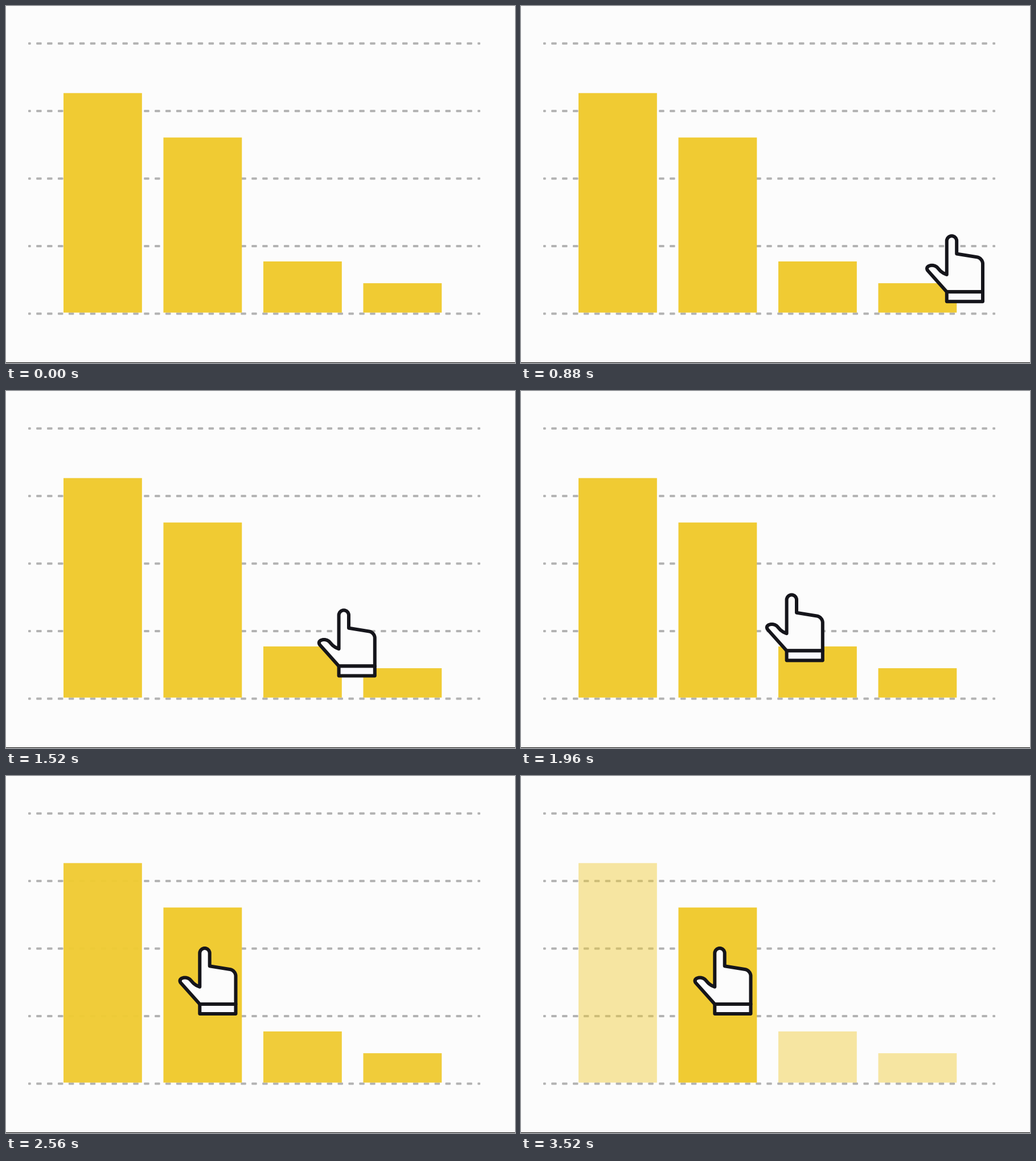
These frames come from a looping animation (894x626 px, 5000 ms). A matplotlib script:

```python
import numpy as np
import matplotlib.pyplot as plt
from matplotlib.animation import FuncAnimation
from matplotlib.collections import PolyCollection
from matplotlib.patches import PathPatch, Rectangle
from matplotlib.path import Path
from matplotlib.transforms import Affine2D

W, H = 894, 626
DPI = 64
PX = 72 / DPI  # points per pixel
FRAMES, STEP = 125, 40

PAPER, GRID, BAR, INK, CUFF = "#fcfcfc", "#b2b2b2", "#f0cb33", "#15151b", "#f9f9fd"

fig = plt.figure(figsize=(W / DPI, H / DPI), dpi=DPI, facecolor=PAPER)
ax = fig.add_axes([0, 0, 1, 1])
ax.axis("off")


def box(x0, y0, x1, y1):
    return [(x0, y0), (x1, y0), (x1, y1), (x0, y1)]


def rounded(corners):
    """Closed path through (x, y, radius) corners, each rounded by its radius."""
    pts = np.array([c[:2] for c in corners], float)
    verts, codes = [], []
    for i, (p, r) in enumerate(zip(pts, (c[2] for c in corners))):
        back, ahead = pts[i - 1] - p, pts[(i + 1) % len(pts)] - p
        back, ahead = (r * v / np.hypot(*v) for v in (back, ahead))
        verts += [p + back, p + 0.45 * back, p + 0.45 * ahead, p + ahead]
        codes += [Path.LINETO] + [Path.CURVE4] * 3
    codes[0] = Path.MOVETO
    return Path(verts + verts[:1], codes + [Path.CLOSEPOLY])


# Dashed grid lines, with half a dash at each end
LEFT, RIGHT, PERIOD = 39, 833, 794 / 42
dashes = []
for row in range(5):
    y = 65.7 + 118.45 * row
    for mid in LEFT + PERIOD * np.arange(43):
        x0, x1 = max(LEFT, mid - PERIOD / 4), min(RIGHT, mid + PERIOD / 4)
        dashes.append(box(x0 + 1, y - 1, x1 - 1, y + 1))
ax.add_collection(PolyCollection(dashes, facecolors=GRID, edgecolors=GRID, snap=False,
                                 linewidths=2 * PX, joinstyle="round", zorder=1))

# Bars
BASE, BAR_W, PITCH = 537.6, 137.8, 175.5
bars = [ax.add_patch(Rectangle((101 + PITCH * i, BASE - h), BAR_W, h,
                               fc=BAR, lw=0, snap=False, zorder=2))
        for i, h in enumerate([384.9, 307, 89.7, 51.5])]
faded = bars[:1] + bars[2:]

ax.add_patch(Rectangle((0, H - 1), W, 1, fc="black", lw=0, zorder=2))

# Pointing hand, measured from its top left corner
WRIST, SIDE, TIP = 37.8, 101, 3
palm = rounded([
    (WRIST, 101, 0), (-0.7, 58, 8), (16, 52.5, 8), (29, 67, 5), (WRIST, 70.8, 0),
    (WRIST, TIP, 8.7), (WRIST + 17.4, TIP, 8.7), (WRIST + 17.4, 34.3, 0),
    (SIDE, 41.7, 10), (SIDE, 101, 0)])
cuff = rounded([(x, y, 0) for x, y in box(WRIST, 101, SIDE, 118)])
hand = [ax.add_patch(PathPatch(shape, fc=fill, ec=INK, lw=6 * PX, snap=False,
                               joinstyle="round", zorder=3))
        for shape, fill in [(palm, PAPER), (cuff, CUFF)]]
ax.set(xlim=(0, W), ylim=(H, 0))

# One Bezier curve from the right edge to the second bar, measured by arc length
ends = np.array([(302.5, 299), (452, 396), (740, 406), (890, 406)])
t = np.linspace(0, 1, 800)[:, None]
basis = np.hstack([(1 - t) ** 3, 3 * t * (1 - t) ** 2, 3 * t ** 2 * (1 - t), t ** 3])
track = basis @ ends
length = np.r_[0, np.cumsum(np.hypot(*np.diff(track, axis=0).T))]

# Motion runs at 30 ticks a second and is shown at 25
ENTER, ARRIVE, SPEED = 5, 75, 8.65
FADE_TICKS, FADE_TO = 30, 0.45


def draw(k):
    tick = int(1.2 * k + 0.25)
    left = max(0, SPEED * (ARRIVE - tick))
    x, y = (np.interp(left, length, axis) for axis in track.T)
    place = Affine2D().translate(x, y) + ax.transData
    for part in hand:
        part.set_transform(place)
        part.set_visible(tick >= ENTER)

    fade = np.clip((tick - ARRIVE) / FADE_TICKS, 0, 1)
    for bar in faded:
        bar.set_alpha(1 - (1 - FADE_TO) * fade)
    return hand + faded


anim = FuncAnimation(fig, draw, frames=FRAMES, interval=STEP, repeat=True,
                     repeat_delay=0, blit=False)
plt.show()
```
